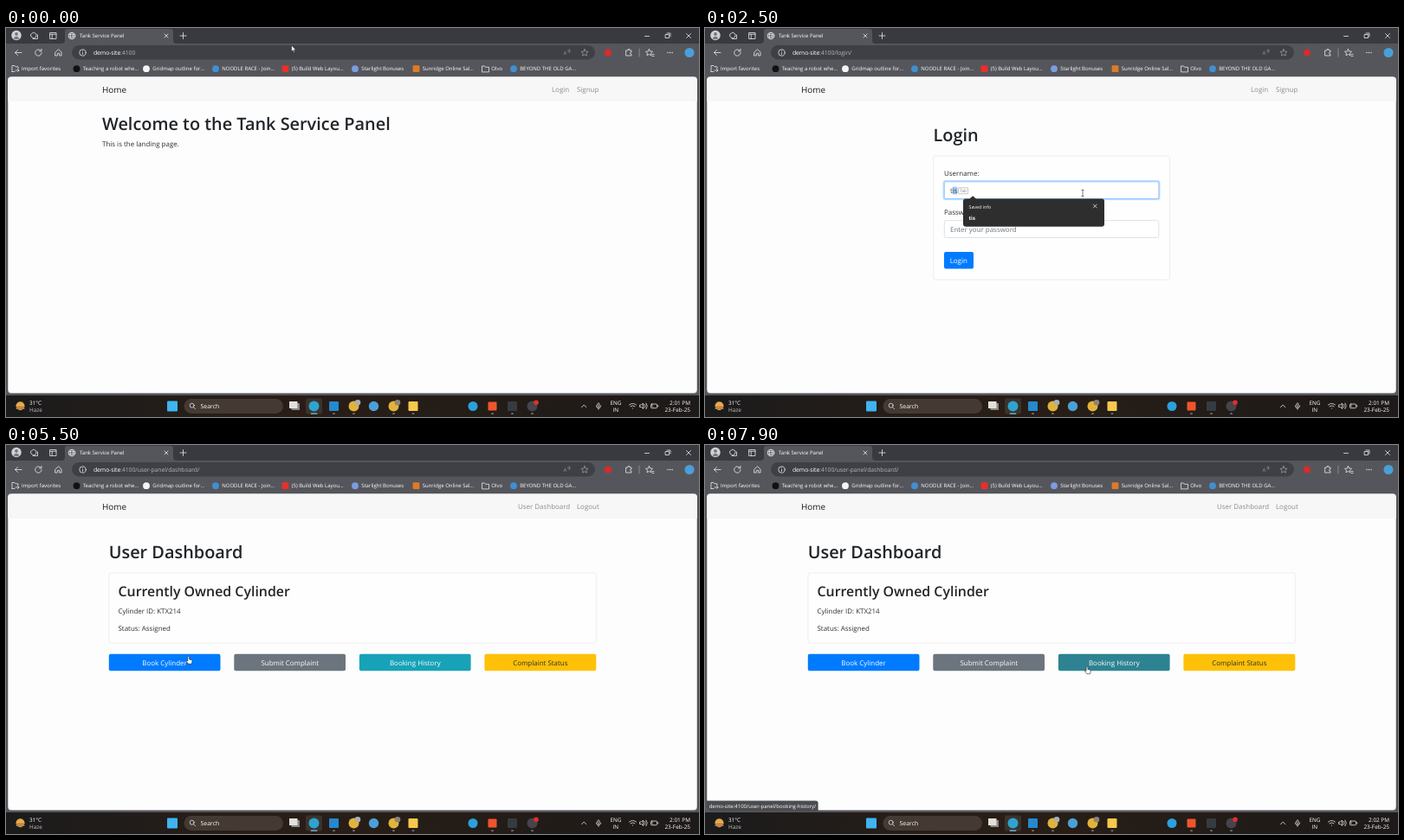
Animation of 800 by 450 pixels, one loop 8 s. Source, as an HTML page:

```html
<!DOCTYPE html>
<html lang="en">
<head>
<meta charset="utf-8">
<title>Browser session</title>
<style>
html, body { margin: 0; width: 100%; height: 100%; overflow: hidden; background: #55565c; }
svg { display: block; width: 800px; height: 450px; }
text { font: 7.95px "Open Sans", "Noto Sans", sans-serif; fill: #2b2f33; text-rendering: geometricPrecision; white-space: pre; }
.s, .s text { font-size: 6px; font-weight: 500; fill: #fff; }
.task text { font-size: 6.4px; }
.h1 { font-size: 19.9px; font-weight: 600; fill: #212529; }
.h2 { font-size: 15.9px; font-weight: 600; fill: #212529; }
.brand { font-size: 9.9px; fill: #1c1c1c; }
.url { font-size: 6.85px; letter-spacing: -.013em; fill: #b4b5b8; }
.url .host { fill: #fff; }
.nav text { fill: #8c8c8c; }
.nav .hot + text { fill: #5c5c5c; }
.mid text { text-anchor: middle; }
.end { text-anchor: end; }
.white, .mid .white { fill: #fff; }
.hint { fill: #6c757d; }
.line { fill: none; stroke: #e8e8ea; stroke-width: .8; stroke-linecap: round; stroke-linejoin: round; }
.dim { stroke: #97989c; }
.card { fill: #fff; fill-opacity: .6; stroke: #e2e2e2; stroke-width: .6; }
.field { fill: #fff; stroke: #ced4da; stroke-width: .7; }
.glow { fill: #fff; stroke: #80bdff; stroke-width: .8; }
.halo { fill: #bfdeff; }
.hit { fill: none; }
.blue { fill: #007bff; }
.grey { fill: #6c757d; }
.teal { fill: #17a2b8; }
.gold { fill: #ffc107; }
.grey.hot { fill: #5a6268; }
.teal.hot { fill: #2d8392; }
.pointer { fill: #fff; stroke: #222; stroke-width: .6; stroke-linejoin: round; }
</style>
</head>
<body>
<svg viewBox="0 0 800 450">
  <defs>
    <linearGradient id="desk">
      <stop offset="0" stop-color="#1b1b1c"/><stop offset=".4" stop-color="#291e16"/><stop offset="1" stop-color="#1d1a19"/>
    </linearGradient>
  </defs>

  <!-- window -->
  <rect width="800" height="425" fill="#55565c"/>
  <rect width="800" height="18" fill="#383a40"/>
  <path d="M64 18q4 0 4-4V4q0-3 3-3H190q3 0 3 3V14q0 4 4 4z" fill="#55565c"/>
  <circle cx="12" cy="8.5" r="5.7" fill="#d2d2d4"/>
  <circle cx="12" cy="7" r="1.9" fill="#77787c"/>
  <path d="M8.5 12q3.500-4.500 7 0q-3.500 2.600-7 0" fill="#77787c"/>
  <g class="line">
    <path d="M29 7l3-2 3 2v3l-3 2-3-2zM31 12.500h5.500V8"/>
    <path d="M51 5.500h7v7h-7zM51 7.300h7M53.200 7.300v5"/>
    <path d="M183 7l4 4m0-4l-4 4M201 9h7m-3.500-3.500v7"/>
    <path d="M737.500 9.500h5M761.500 7.500h4v4h-4zM763 6h4v4M785.500 6.500l5 5m0-5l-5 5"/>
  </g>
  <g id="globe" class="line"><circle cx="76" cy="9" r="3.8"/><ellipse cx="76" cy="9" rx="1.7" ry="3.8"/><path d="M72.500 7.700h7m-7 2.600h7"/></g>
  <path id="spin" class="line" d="M80 9a4 4 0 1 1-8 0a4 4 0 1 1 8 0"/>
  <text class="s" x="85" y="11.200">Tank Service Panel</text>

  <!-- toolbar -->
  <rect x="76" y="20" width="604" height="16.500" rx="8.200" fill="#3f4045"/>
  <g class="line">
    <path d="M18 28.500h-7.500m3-3l-3 3 3 3"/>
    <path id="reload" d="M40.500 26.500a3.700 3.700 0 1 0 .6 2M41 24.300v2.500h-2.500"/>
    <path id="stop" d="M34.500 25.500l6 6m0-6l-6 6"/>
    <path d="M57 28l3.500-3.300L64 28v4h-2.300v-2.700h-2.400V32H57z"/>
    <circle cx="88.500" cy="28.500" r="3.700"/><path d="M88.500 28.300v2M88.500 26.500v.1"/>
    <path class="dim" d="M668 24.500l1.200 2.600 2.800.3-2.100 1.900.6 2.800-2.500-1.400-2.500 1.400.6-2.800-2.100-1.900 2.800-.3z"/>
    <path d="M716 26h2q-.3-1.800 1-1.800t1 1.800h2v2q-1.500 0-1.500 1.200t1.500 1.200V32h-6z"/>
    <path class="dim" d="M731 24v9"/>
    <path d="M742.500 24.500l1.200 2.500 2.800.3-2 1.800.5 2.600-2.500-1.200-2.500 1.200.5-2.600-2-1.800 2.800-.3zM746 30.500h2M746 32.500h2"/>
    <path d="M764 28.500h.1m2.400 0h.1m2.400 0h.1" stroke-width="1.300"/>
  </g>
  <g data-on="0-3300 5100-8000"><text class="s" x="643.500" y="31" style="fill:#97989c">A</text><path class="line dim" d="M649 25.500q1 1 0 2M650.500 24.800q1.500 1.700 0 3.500"/></g>
  <g data-on="3300-5100" class="line dim"><circle cx="646.500" cy="28.500" r="3.800"/><path d="M644.800 28.500h.1m1.600 0h.1m1.600 0h.1"/></g>
  <circle cx="695" cy="28.500" r="3.900" fill="#d92b2b"/>
  <circle cx="789" cy="28.500" r="5.500" fill="#4b9fd8"/>
  <text class="url" x="101" y="31"><tspan class="host">demo-site</tspan>:4100<tspan id="path"></tspan></text>
  <path class="line" d="M7 50.500V43.500h3l1 1.300h3v2M7 50.500h3M11 49h4m-1.500-1.500L15 49l-1.500 1.500"/>
  <g id="marks" class="s"><text x="18" y="49.400">Import favorites</text></g>

  <!-- page -->
  <rect x="2" y="56.200" width="796" height="366.600" rx="4" fill="#fdfdfd" stroke="#404146" stroke-width=".5"/>
  <path d="M2.200 85V60.400q0-4 4-4H793.800q4 0 4 4V85z" fill="#f7f7f7"/>
  <text class="brand" x="111" y="74.800">Home</text>
  <g class="nav" data-on="0-5100">
    <rect class="hit" data-hit="hand" x="626" y="62" width="28" height="18"/><text x="630" y="74.300">Login</text>
    <text x="659" y="74.300">Signup</text>
  </g>
  <g class="nav" data-on="5100-8000"><text x="591" y="74.300">User Dashboard</text><text x="659" y="74.300">Logout</text></g>

  <g data-on="0-1100">
    <text class="h1" x="111" y="118.400">Welcome to the Tank Service Panel</text>
    <text x="111" y="136.600">This is the landing page.</text>
  </g>

  <g data-on="1100-5100">
    <text class="h1" x="263.500" y="131">Login</text>
    <rect class="card" x="263.700" y="148.200" width="272.800" height="143" rx="2"/>
    <text x="276" y="170.600">Username:</text>
    <text x="276" y="215.500">Password:</text>
    <rect class="halo" data-on="0-3300" x="274.500" y="176" width="251" height="23.200" rx="3.200"/>
    <rect class="halo" data-on="3300-8000" x="274.500" y="221" width="251" height="23.200" rx="3.200"/>
    <rect class="field" data-hit="beam" x="276.300" y="177.800" width="247.500" height="19.700" rx="2"/>
    <rect class="field" data-hit="beam" x="276.300" y="222.700" width="247.500" height="19.700" rx="2"/>
    <rect class="glow" data-on="0-3300" x="276.300" y="177.800" width="247.500" height="19.700" rx="2"/>
    <rect class="glow" data-on="3300-8000" x="276.300" y="222.700" width="247.500" height="19.700" rx="2"/>
    <text class="hint" data-on="0-2300" x="283" y="190.800">Enter your username</text>
    <rect data-on="2300-2900" x="285.700" y="183.700" width="5.500" height="8.800" fill="#9cc8f8"/>
    <text data-on="2300-8000" x="283" y="190.800" style="fill:#495057">tis</text>
    <text class="hint" data-on="0-3600" x="283" y="235.700">Enter your password</text>
    <g fill="#333">
      <circle data-on="3600-8000" cx="284.700" cy="233" r="1.150"/>
      <circle data-on="3800-8000" cx="288.200" cy="233" r="1.150"/>
      <circle data-on="4000-8000" cx="291.700" cy="233" r="1.150"/>
    </g>
    <g data-on="3600-8000" class="line" style="stroke:#222"><path d="M505.300 232.800q4.700-6 9.400 0"/><circle cx="510" cy="233" r="1.900"/></g>
    <rect id="caret" width=".7" height="9.500" fill="#222"/>
    <rect class="blue" data-hit="hand" x="276" y="259" width="34" height="19.500" rx="2"/>
    <text class="white" x="282.700" y="271.800">Login</text>
    <g data-on="2300-2900">
      <rect x="292.500" y="184.800" width="11" height="7" rx="1" fill="#fff" stroke="#999" stroke-width=".6"/>
      <text x="294.300" y="190" style="font-size:4.600px;fill:#777">Tab</text>
      <path d="M305 198l4.200-3.800 4.200 3.800z" fill="#2e2e2e"/>
      <rect x="298" y="197.500" width="163" height="32.300" rx="3" fill="#2e2e2e"/>
      <text class="s" x="304.500" y="208.700" style="font-size:5.300px">Saved info</text>
      <text class="s" x="304.500" y="222" style="font-weight:700">tis</text>
      <path class="line" d="M448.300 204l4 4m0-4l-4 4"/>
    </g>
  </g>

  <g data-on="5100-5900 7200-8000">
    <text class="h1" x="118.700" y="131">User Dashboard</text>
    <rect class="card" x="119" y="148.200" width="562.300" height="80.800" rx="2"/>
    <text class="h2" x="129.500" y="175.200">Currently Owned Cylinder</text>
    <text x="129.500" y="194.500">Cylinder ID: KTX214</text>
    <text x="129.500" y="215.300">Status: Assigned</text>
    <g class="mid">
      <rect class="blue" data-hit="hand" x="118.800" y="241.700" width="128.700" height="19.600" rx="2"/><text class="white" x="183" y="254.700">Book Cylinder</text>
      <rect class="grey" data-hit="hand" x="263.300" y="241.700" width="128.700" height="19.600" rx="2"/><text class="white" x="327.700" y="254.700">Submit Complaint</text>
      <rect class="teal" data-hit="hand" x="407.900" y="241.700" width="128.700" height="19.600" rx="2"/><text class="white" x="472.300" y="254.700">Booking History</text>
      <rect class="gold" data-hit="hand" x="552.400" y="241.700" width="128.900" height="19.600" rx="2"/><text x="616.800" y="254.700">Complaint Status</text>
    </g>
  </g>

  <g data-on="5900-7200">
    <text class="h1" x="111" y="118.400">Book a Cylinder</text>
    <text x="111" y="136.600">Click the button below to book a cylinder.</text>
    <rect class="blue" data-hit="beam" x="111" y="148" width="51.300" height="19.500" rx="2"/>
    <text class="white" x="117.500" y="160.900">Book Now</text>
  </g>

  <g id="status"><path id="bar" fill="#4b4c50"/><text class="s" x="4.700" y="419.500"></text></g>

  <!-- taskbar -->
  <rect y="425" width="800" height="25" fill="url(#desk)"/>
  <circle cx="16.500" cy="437.300" r="5" fill="#e8a94a"/>
  <path d="M12 438.500h9M11.500 440.500h10" stroke="#9a6a4a" stroke-width="1"/>
  <g class="s task">
    <text x="27" y="435.500">31°C</text><text x="27" y="443.800" style="fill:#c4c2c0">Haze</text>
    <rect x="205.500" y="429" width="114.500" height="17" rx="8.500" fill="#443a33"/>
    <text x="224.500" y="440" style="font-size:6.900px">Search</text>
    <text x="697.500" y="435.500">ENG</text><text x="700.500" y="443.700">IN</text>
    <text id="clock" class="end" x="790" y="435.500"></text><text class="end" x="790" y="443.700">23-Feb-25</text>
  </g>
  <g class="line">
    <circle cx="214.700" cy="436.700" r="2.500"/><path d="M216.600 438.700l2 2"/>
    <path d="M664.500 438.700l2.700-2.700 2.700 2.700"/>
    <path d="M683 434.500q1-1.500 2 0v3q-1 1.500-2 0zM681.300 437q.3 2.700 2.700 2.700t2.700-2.700M684 439.800v1.500"/>
    <path d="M719.500 436q4-3.300 8 0M721 437.800q2.500-2 5 0M723.400 440h.2"/>
    <path d="M732 436h1.500l2-2v6.500l-2-2H732zM737.300 435.300q1.500 2 0 4M739 434q2.600 3.300 0 6.600"/>
    <rect x="744.500" y="435" width="7" height="4.700" rx="1"/><path d="M752.800 436.700v1.300M746 436.500v1.700"/>
  </g>
  <rect x="329.500" y="434" width="9.500" height="8" fill="#8a8784"/><rect x="327" y="432" width="9.500" height="8" fill="#e2e0de"/>
  <rect x="346" y="428.500" width="19" height="18" rx="2" fill="#3a332d"/>
  <g id="apps"></g>

  <!-- pointers -->
  <g id="mouse" class="pointer">
    <path id="arrow" d="M0 0V7.300L1.700 5.800 2.900 8.300 4 7.800 2.900 5.400H5.200z"/>
    <path id="hand" d="M-.9 .8Q0-.6 .9 .8V3.500L3.600 4.200Q4.400 4.500 4.200 6L3.600 8.800H0L-2.700 5.700Q-2.300 4.400-.9 5.500z"/>
    <g id="beam">
      <path d="M0-3.200V3.200" stroke="#fff" stroke-width="1.600"/>
      <path d="M-1.500-3.500H1.500M0-3.500V3.500M-1.500 3.500H1.500"/>
    </g>
  </g>
</svg>
<script>
const LOOP = 8000, STEP = 100;
const $ = id => document.getElementById(id);
const show = (el, on) => { el.style.display = on ? '' : 'none'; };

function add(parent, tag, attrs, text) {
  const el = document.createElementNS('http://www.w3.org/2000/svg', tag);
  for (const k in attrs) el.setAttribute(k, attrs[k]);
  if (text) el.textContent = text;
  parent.append(el);
}
const dot = (p, cx, cy, r, fill) => add(p, 'circle', { cx, cy, r, fill });
const box = (p, cx, cy, r, fill) =>
  add(p, 'rect', { x: cx - r, y: cy - r, width: 2 * r, height: 2 * r, rx: 1, fill });

[
  [dot, 81.5, '#111', 'Teaching a robot whe...'],
  [dot, 162, '#f4f4f4', 'Gridmap outline for...'],
  [dot, 242, '#3f8fd4', 'NOODLE RACE - Join...'],
  [box, 322.5, '#e8302a', '(5) Build Web Layou...'],
  [dot, 403, '#7d9be0', 'Starlight Bonuses'],
  [box, 473.5, '#e07a25', 'Sunridge Online Sal...'],
  [null, 553, '', 'Olvo'],
  [dot, 586, '#3f8fd4', 'BEYOND THE OLD GA...']
].forEach(([shape, x, fill, label]) => {
  if (shape) shape($('marks'), x, 47.2, 3.9, fill);
  else add($('marks'), 'path', { class: 'line', d: 'M549.5 50.500V44h3l1 1.300h4v5.200z' });
  add($('marks'), 'text', { x: x + 7.2, y: 49.4 }, label);
});

// shape, x, radius, colour, running-mark width
[
  [box, 192, 6, '#3fb4f0', 0],
  [dot, 355.5, 6, '#2fa3cf', 8],
  [box, 378.5, 5.5, '#2489d0', 3],
  [dot, 401.5, 6, '#e2b33a', 3],
  [dot, 424.5, 5.7, '#4b9fd8', 0],
  [dot, 447.5, 6, '#e2b33a', 3],
  [box, 470, 5.5, '#f6c84c', 3],
  [dot, 539, 5.5, '#2ba0dc', 0],
  [box, 561.5, 5, '#f0552b', 3],
  [box, 584.5, 5.5, '#353b40', 3],
  [dot, 607.5, 6, '#44444a', 3]
].forEach(([shape, x, r, fill, w]) => {
  shape($('apps'), x, 437.5, r, fill);
  if (w) add($('apps'), 'rect', { x: x - w / 2, y: 445.4, width: w, height: 1.4, rx: .7, fill: w > 3 ? '#7cc4f4' : '#9a9794' });
});
dot($('apps'), 406, 433.2, 3.3, '#a9b0b2');
dot($('apps'), 452, 433.2, 3.3, '#8d8378');
dot($('apps'), 612, 433.2, 2.8, '#e02f2f');

const paths = [[0, ''], [1100, '/login/'], [5100, '/user-panel/dashboard/'],
  [5900, '/user-panel/book-cylinder/'], [7200, '/user-panel/dashboard/']];
const loads = [[1000, 1100], [4400, 5100], [5800, 5900], [6800, 7200]];
const hovers = [[800, 1100, '/login/'], [5600, 5900, '/user-panel/book-cylinder/'],
  [7700, 8000, '/user-panel/booking-history/']];
const route = [[0, 329.5, 20], [200, 345, 24], [700, 652, 76], [900, 639, 71.5], [1300, 639, 71.5],
  [1900, 436, 191], [4200, 436, 191], [4400, 432.5, 188], [5100, 432.5, 188], [5600, 185, 251],
  [5900, 188, 252], [6100, 199, 254], [6300, 199, 254], [6700, 142, 159.5], [7200, 142, 159.5],
  [7800, 441, 256], [8000, 441, 256]];

const timed = [...document.querySelectorAll('[data-on]')].map(el =>
  ({ el, spans: el.dataset.on.split(' ').map(s => s.split('-').map(Number)) }));
const hits = [...document.querySelectorAll('[data-hit]')].map(el =>
  ({ el, page: el.closest('[data-on]'), r: ['x', 'y', 'width', 'height'].map(k => +el.getAttribute(k)) }));

function place(t) {
  const i = route.findIndex(k => k[0] > t), [t0, x0, y0] = route[i - 1], [t1, x1, y1] = route[i];
  const p = (t - t0) / (t1 - t0), e = p * p * (3 - 2 * p);
  return [x0 + (x1 - x0) * e, y0 + (y1 - y0) * e];
}

function drawPointer(t, loading) {
  const [x, y] = place(t);
  let kind = 'arrow';
  for (const { el, page, r } of hits) {
    const over = page.style.display !== 'none' &&
      x >= r[0] && x <= r[0] + r[2] && y >= r[1] && y <= r[1] + r[3];
    el.classList.toggle('hot', over);
    // a submitted form no longer takes text
    if (over && !(loading && el.matches('.field'))) kind = el.dataset.hit;
  }
  for (const k of ['arrow', 'hand', 'beam']) show($(k), k === kind);
  $('mouse').setAttribute('transform', `translate(${x} ${y})`);
}

function drawLoading(t, load) {
  show($('globe'), !load);
  show($('reload'), !load);
  show($('spin'), load);
  show($('stop'), load);
  if (!load) return;
  const age = t - load[0], len = Math.min(8, 1 + 4 * (age / 400) ** 2);
  $('spin').setAttribute('stroke-dasharray', `${len} 30`);
  $('spin').setAttribute('transform', `rotate(${170 + 1.8 * age} 76 9)`);
}

function drawStatus(t) {
  const h = hovers.find(([a, b]) => t >= a && t < b + 200);
  show($('status'), h);
  if (!h) return;
  const label = $('status').lastChild;
  label.textContent = 'demo-site:4100' + h[2];
  const w = label.getComputedTextLength() + 5;
  $('bar').setAttribute('d', `M2 411.500h${w - 3}q3 0 3 3V423H6q-4 0-4-4z`);
  $('status').style.opacity = t < h[1] ? 1 : 1 - (t - h[1]) / 200;
}

function drawCaret(t) {
  const inPass = t >= 3300;
  const typed = inPass ? [3600, 3800, 4000].filter(k => t >= k).length * 3.5 : t >= 2900 ? 8.8 : 0;
  show($('caret'), Math.floor(t / 500) % 2 === 0 && !(t >= 2300 && t < 2900));
  $('caret').setAttribute('x', 282.8 + typed);
  $('caret').setAttribute('y', inPass ? 228 : 183);
}

function draw(t) {
  for (const { el, spans } of timed) show(el, spans.some(([a, b]) => t >= a && t < b));
  const load = loads.find(([a, b]) => t >= a && t < b);
  $('path').textContent = paths.filter(p => p[0] <= t).pop()[1];
  $('clock').textContent = t < 6500 ? '2:01 PM' : '2:02 PM';
  drawLoading(t, load);
  drawStatus(t);
  drawCaret(t);
  drawPointer(t, load);
}

const start = performance.now();
function tick() {
  const t = (performance.now() - start) % LOOP;
  draw(Math.floor(t / STEP) * STEP);
  requestAnimationFrame(tick);
}
tick();
</script>
</body>
</html>
```
